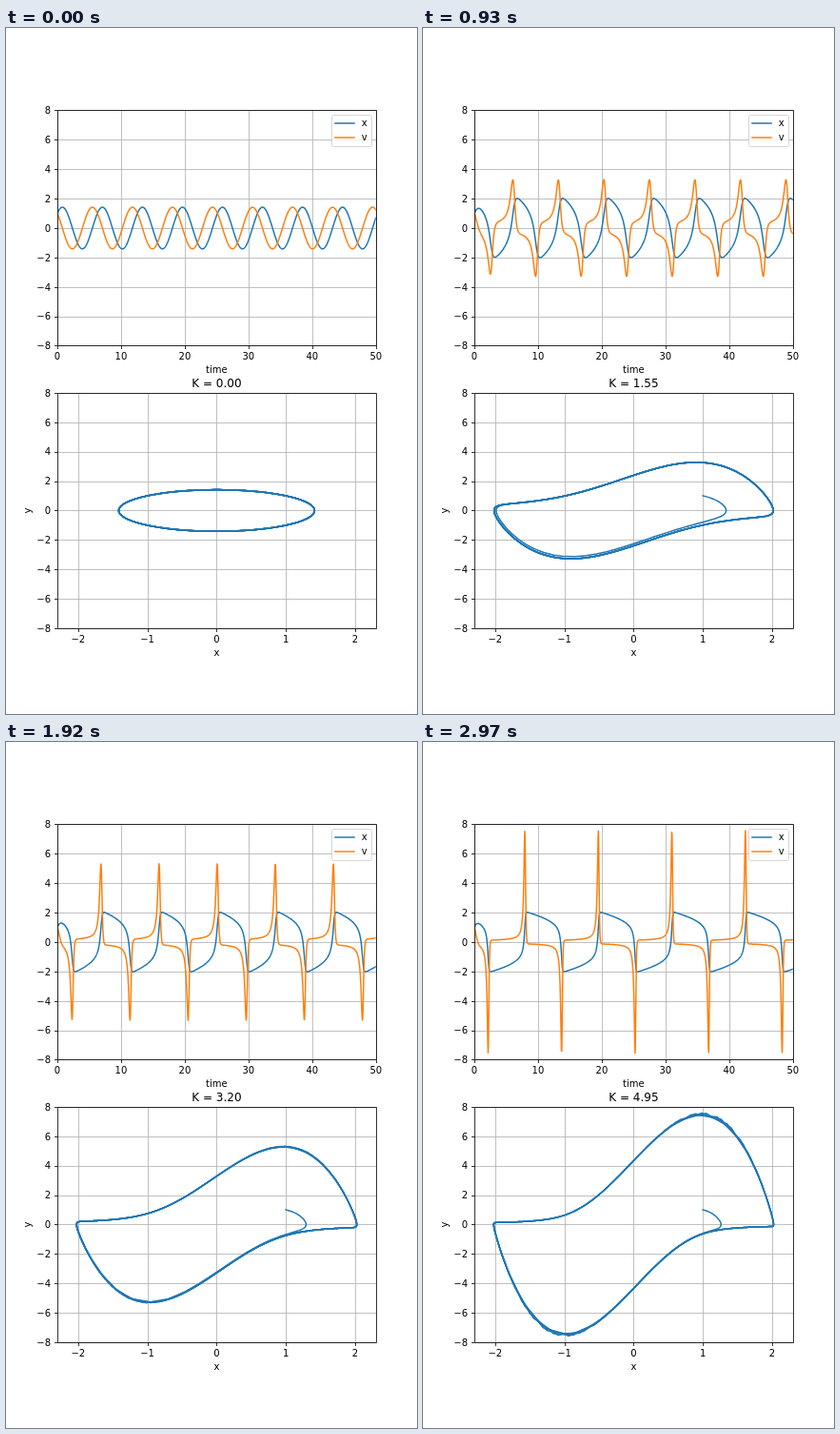
Animation of 432 by 720 pixels, one loop 3000 ms. Source, as an HTML page:

```html
<!DOCTYPE html>
<html lang="en">
<head>
<meta charset="utf-8">
<title>Oscillator</title>
<style>
  html, body { margin: 0; width: 100%; height: 100%; overflow: hidden; background: #fff; }
  svg { display: block; width: 432px; height: 720px; }
  text { font: 10px "DejaVu Sans", sans-serif; fill: #000; }
  .title { font-size: 12px; }
  .axis { stroke: #000; stroke-width: 0.8; fill: none; }
  .grid { stroke: #b0b0b0; stroke-width: 0.8; fill: none; }
  .curve { fill: none; stroke-width: 1.5; stroke-linejoin: round; stroke-linecap: square; }
</style>
</head>
<body>
<svg id="stage" viewBox="0 0 432 720"></svg>
<script>
const BLUE = '#1f77b4', ORANGE = '#ff7f0e';
const LEFT = 54, RIGHT = 388.8, HEIGHT = 543.6 / 2.2, MIDDLE = (LEFT + RIGHT) / 2;
const FRAME_MS = 30, FRAMES = 100, K_STEP = 0.05;
const SAMPLES = 1000, DURATION = 50, SUBSTEPS = 8, CHUNK = 100;

const stage = document.getElementById('stage');

function add(parent, tag, attrs, content) {
  const node = document.createElementNS('http://www.w3.org/2000/svg', tag);
  for (const name in attrs) node.setAttribute(name, attrs[name]);
  if (content !== undefined) node.textContent = content;
  parent.appendChild(node);
  return node;
}

const snap = p => Math.floor(p + 0.5) + 0.5;
const label = (x, y, content, anchor = 'middle') =>
  add(stage, 'text', { x, y, 'text-anchor': anchor }, content);
const minus = n => String(n).replace('-', '\u2212');

// Draws the grid, ticks and frame of one plot; returns its scales and curve layer.
function makePlot(id, top, xMin, xMax, xTicks) {
  const bottom = top + HEIGHT;
  const sx = x => LEFT + (x - xMin) / (xMax - xMin) * (RIGHT - LEFT);
  const sy = y => top + (8 - y) / 16 * HEIGHT;
  const [l, r, t, b] = [LEFT, RIGHT, top, bottom].map(snap);
  const clip = add(stage, 'clipPath', { id });
  add(clip, 'rect', { x: LEFT, y: top, width: RIGHT - LEFT, height: HEIGHT });

  let grid = '', ticks = '';
  for (const value of xTicks) {
    const x = snap(sx(value));
    grid += `M${x} ${t}V${b}`;
    ticks += `M${x} ${b}v3.5`;
    label(sx(value), bottom + 14.6, minus(value));
  }
  for (let value = -8; value <= 8; value += 2) {
    const y = snap(sy(value));
    grid += `M${l} ${y}H${r}`;
    ticks += `M${l} ${y}h-3.5`;
    label(47, sy(value) + 3.8, minus(value), 'end');
  }
  add(stage, 'path', { class: 'grid', d: grid });
  const layer = add(stage, 'g', { 'clip-path': `url(#${id})` });
  add(stage, 'path', { class: 'axis', d: `${ticks}M${l} ${t}H${r}V${b}H${l}Z` });
  return { sx, sy, layer };
}

const curve = (parent, stroke) => add(parent, 'path', { class: 'curve', stroke });

const timePlot = makePlot('time-area', 86.4, 0, 50, [0, 10, 20, 30, 40, 50]);
const phasePlot = makePlot('phase-area', 630 - HEIGHT, -2.3, 2.3, [-2, -1, 0, 1, 2]);
const xCurve = curve(timePlot.layer, BLUE);
const vCurve = curve(timePlot.layer, ORANGE);
// Separate strokes let repeated orbits build up weight at their edges.
const orbits = Array.from({ length: SAMPLES / CHUNK }, () => curve(phasePlot.layer, BLUE));

label(MIDDLE, 362, 'time');
label(MIDDLE, 659, 'x');
add(stage, 'text', { transform: 'translate(26 506.5) rotate(-90)', 'text-anchor': 'middle' }, 'y');
const title = label(MIDDLE, 377, '');
title.setAttribute('class', 'title');

add(stage, 'rect', {
  x: 342.5, y: 91.5, width: 42, height: 33, rx: 2,
  fill: '#fff', stroke: '#ccc', opacity: 0.8
});
[['x', BLUE, 100], ['v', ORANGE, 115]].forEach(([name, color, y]) => {
  curve(stage, color).setAttribute('d', `M346 ${y}H366`);
  label(373.8, y + 3, name, 'start');
});

// Van der Pol oscillator: x'' = K (1 - x^2) x' - x, solved with Runge-Kutta.
function solve(k) {
  const dt = DURATION / (SAMPLES - 1), h = dt / SUBSTEPS;
  const accel = (x, v) => k * (1 - x * x) * v - x;
  const points = [];
  let x = 1, v = 1;
  for (let i = 0; i < SAMPLES; i++) {
    points.push({ t: i * dt, x, v });
    for (let s = 0; s < SUBSTEPS; s++) {
      const a1 = accel(x, v);
      const v2 = v + a1 * h / 2, a2 = accel(x + v * h / 2, v2);
      const v3 = v + a2 * h / 2, a3 = accel(x + v2 * h / 2, v3);
      const v4 = v + a3 * h, a4 = accel(x + v3 * h, v4);
      x += h / 6 * (v + 2 * v2 + 2 * v3 + v4);
      v += h / 6 * (a1 + 2 * a2 + 2 * a3 + a4);
    }
  }
  return points;
}

const trace = (points, { sx, sy }, across, up) => 'M' + points.map(
  p => sx(p[across]).toFixed(2) + ' ' + sy(p[up]).toFixed(2)).join('L');

function draw(frame) {
  const k = frame * K_STEP;
  const points = solve(k);
  xCurve.setAttribute('d', trace(points, timePlot, 't', 'x'));
  vCurve.setAttribute('d', trace(points, timePlot, 't', 'v'));
  orbits.forEach((orbit, i) => {
    const part = points.slice(i * CHUNK, (i + 1) * CHUNK + 1);
    orbit.setAttribute('d', trace(part, phasePlot, 'x', 'v'));
  });
  title.textContent = 'K = ' + k.toFixed(2);
}

let start, shown = -1;
function tick(now) {
  start ??= now;
  const frame = Math.floor((now - start) / FRAME_MS) % FRAMES;
  if (frame !== shown) draw(shown = frame);
  requestAnimationFrame(tick);
}
draw(0);
requestAnimationFrame(tick);
</script>
</body>
</html>
```
